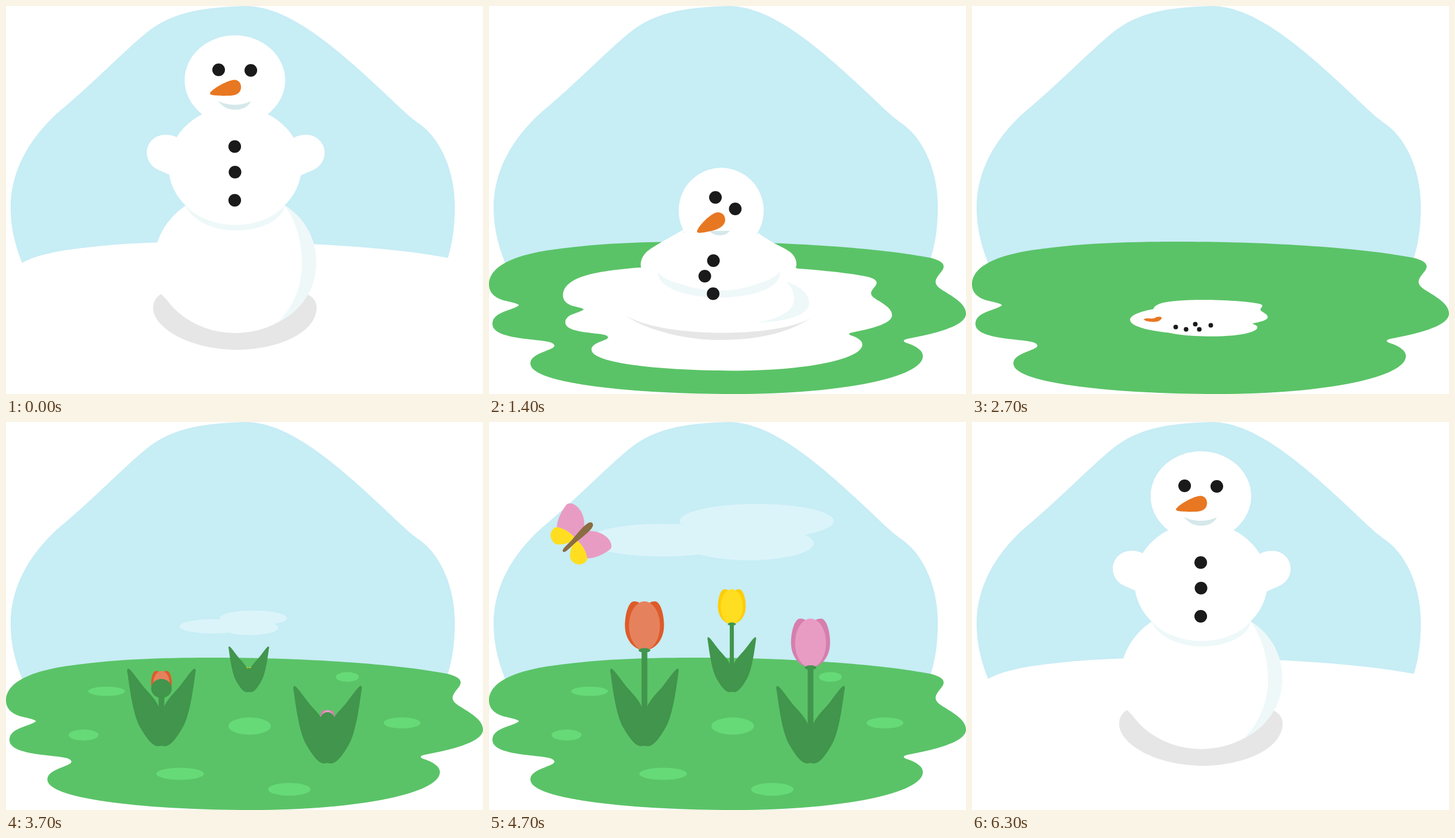
An HTML page with a canvas that plays this animation: 830 px wide and 675 px high, repeating every 6500 ms.

```html
<!DOCTYPE html>
<html lang="en">
<head>
<meta charset="utf-8">
<title>Snow melts into spring</title>
<style>
html, body { margin: 0; width: 100%; height: 100%; overflow: hidden; background: #fff; }
canvas { display: block; }
</style>
</head>
<body>
<canvas id="stage" width="830" height="675"></canvas>
<script>
const ctx = document.getElementById('stage').getContext('2d');
const LOOP = 6500, LAST_STEP = 46;
const WHITE = '#fff', GREEN = '#5ac367', LEAF = '#41954c', ICE = '#eef8f9', BLACK = '#1a1a1a';

const clamp = (v, lo = 0, hi = 1) => Math.min(hi, Math.max(lo, v));
const lerp = (a, b, p) => a + (b - a) * p;

// Blends the numbers of two equally built strings; keys are steps.
function tween(keys, s) {
  const steps = Object.keys(keys).map(Number);
  let i = 0;
  while (i < steps.length - 2 && s >= steps[i + 1]) i++;
  const [a, b] = [steps[i], steps[i + 1]];
  const p = clamp((s - a) / (b - a));
  const ends = keys[b].match(/-?[\d.]+/g);
  let n = 0;
  return keys[a].replace(/-?[\d.]+/g, v => lerp(+v, +ends[n++], p).toFixed(2));
}

function fill(path, color) {
  ctx.fillStyle = color;
  ctx.fill(new Path2D(path));
}

function ellipse(x, y, rx, ry, color) {
  ctx.fillStyle = color;
  ctx.beginPath();
  ctx.ellipse(x, y, Math.max(0, rx), Math.max(0, ry), 0, 0, 7);
  ctx.fill();
}

const oval = (keys, s, color) => ellipse(...tween(keys, s).split(' ').map(Number), color);

function place(x, y, scale, turn, draw) {
  ctx.save();
  ctx.translate(x, y);
  ctx.rotate(turn);
  ctx.scale(scale, scale);
  draw();
  ctx.restore();
}

function mirrored(draw) {
  draw();
  ctx.scale(-1, 1);
  draw();
  ctx.scale(-1, 1);
}

const SKY = 'M28,447 C15,414 8,384 8,350 C8,290 38,232 92,184 C150,136 200,83 245,46 C292,8 350,2 417,0 ' +
  'C498,0 588,84 690,181 C703,193 712,200 722,207 C758,234 781,290 781,348 C781,380 778,408 769,438 L400,500 Z';

const GROUND = 'M0,485 C0,452 45,433 110,424 C200,411 290,410 365,410 C520,410 680,421 768,438 ' +
  'C800,446 792,457 784,466 C775,477 775,483 783,490 C795,500 830,514 830,535 C830,558 770,571 728,579 ' +
  'C720,581 720,583 726,586 C745,592 755,600 755,609 C755,645 620,675 425,675 C260,675 72,658 72,622 ' +
  'C72,603 112,600 114,591 C112,583 95,583 72,580 C35,576 6,570 6,553 C6,532 40,530 52,521 ' +
  'C52,517 35,515 22,511 C8,506 0,497 0,485 Z';

const SNOW_SCALE = { 0: '1', 1: '1', 7: '0.695', 14: '0.4675', 20: '0.238', 24: '0' };

const SHADOW = {
  0: 'M270,501 C258,508 256,518 256,525 C256,560 320,598 402,598 C470,598 540.5,570 540.5,524 C540.5,514 534,506 525,502 C480,560 320,560 270,501',
  1: 'M260,504 C250,511 248.5,519 248.5,525 C248.5,562 315,596.5 400,596.5 C475,596.5 550.5,570 550.5,525 C550.5,516 546,509 538,505 C490,560 310,560 260,504',
  7: 'M228,531 C229,532 230,533 232,534 C260,558 330,581 402,581 C480,581 530,564 564,540 C566,539 567,538 568,537 C520,580 280,580 228,531'
};
const BASE = {
  0: '399 445 141 124', 1: '399 457 150 112.3', 7: '400 496 170 66',
  14: '395 535 135 50', 20: '383 546 108 24', 24: '410 545 0 0'
};
const BASE_SHADE = {
  0: 'M485,347 C520,368 540,405 540,446 C540,495 510,533 474,550 C500,523 515,487 515,450 C515,410 505,375 485,347',
  1: 'M497,371 C530,392 549,422 549,460 C549,505 515,538 474,554 C505,531 523,498 523,461 C523,425 512,395 497,371',
  7: 'M518,480 C540,486 557,501 557,516 C557,538 520,549 466,551 C500,545 531,532 531,510 C531,497 525,487 518,480'
};
const ARMS = [{
  0: 'M300,230 C292,225 284,224 277,224 C259,224 245,238 245,255 C245,268 253,280 265,285 L290,296 L320,270',
  1: 'M300,261 C290,258 284,256.5 276,256.5 C259,256.5 245.5,270 245.5,287 C245.5,303 257,315 270,318 L290,322 L320,290',
  7: 'M340,388 C320,400 285,418 274,428 C266,436 264,444 264,450 C264,457 268,462 278,466 L300,475 L330,440',
  14: 'M340,500 C320,505 305,510 295,515 C285,520 280,525 280,530 C280,535 285,540 290,545 L300,550 L330,530'
}, {
  0: 'M497,232 C505,226 513,224 523,224 C540,224 554.5,238 554.5,255 C554.5,270 545,281 533,286 L510,296 L480,270',
  1: 'M500,264 C510,261 516,260 524,260 C542,260 555,273 555,290 C555,306 543,319 529,320.5 L510,323 L480,290',
  7: 'M468,394 C488,411 510,418 524,428 C532,434 535,443 535,449 C535,456 530,462 520,466 L500,475 L470,440',
  14: 'M460,500 C480,505 495,510 505,515 C515,520 520,525 520,530 C520,535 515,540 510,545 L500,550 L470,530'
}];
const TORSO_SHADE = {
  0: 'M312,347 C355,392 445,392 485,347 C480,375 440,390.5 400,390.5 C355,390.5 322,370 312,347',
  1: 'M308,368 C355,410 445,410 491,368 C488,397 440,410 400,410 C355,410 325,397 308,368',
  7: 'M294,463 C320,500 480,500 506,462 C510,490 460,507 400,507 C340,507 294,490 294,463',
  14: 'M296,525 C310,570 490,570 500,525 C500,560 460,577 400,577 C340,577 298,560 296,525'
};
const TORSO = { 0: '398.5 278 116 103', 1: '399.5 304 115 97', 7: '400 440 108 55', 14: '398 530 110 40' };
const HEAD = { 0: '398.3 129 87.5 78', 1: '399.8 160 87.5 79', 7: '404 356 74 74.5', 14: '398 525 62 35' };
const MOUTH = {
  0: 'M369,165 C385,174 410,174 426,165.5 C422,176 410,180.5 398,180.5 C386,180.5 375,174 369,165',
  1: 'M370.5,196 C387,205 411,205 428,196 C423,207 411,211 400,211 C388,211 377,206 370.5,196',
  7: 'M383,391 C395,392 408,391 419,391 C415,397 408,399 401,399 C394,399 388,396 383,391',
  14: 'M385,545 C393,546 402,546 410,545 C406,548 402,549 398,549 C394,549 389,548 385,545'
};
const NOSE = {
  0: 'M355,152 C356,146 385,129 397,128.5 C405,128 409,135 409,141 C409,150 402,156 388,156 C375,156.5 353,156 355,152',
  1: 'M357,185 C358,178 385,161 397,160 C406,159 410,167 410,173 C410,182 402,187 388,188 C375,189 357,189 357,185',
  7: 'M362,392 C364,383 385,361 397,359 C406,358 411,365 411,372 C411,381 402,388 388,391 C375,394 361,397 362,392',
  14: 'M328,533 C332,524 352,518 366,516 C376,515 382,522 382,528 C382,536 372,541 360,543 C345,545 327,540 328,533',
  20: 'M299,545 C303,542 312,545 318,543 C322,540 328,540 330,542 C330,546 325,549 318,549.5 C310,550 300,548 299,545',
  23: 'M315,545 C315,545 315,545 315,545 C315,545 315,545 315,545 C315,545 315,545 315,545 C315,545 315,545 315,545'
};
// Two eyes, then three buttons.
const COALS = [
  { 0: '370 111 11 11', 1: '372 143 11 11', 7: '394 333 11 11', 14: '391 525 7.5 7.5', 20: '388.5 553.5 4 4', 23: '388 555 0 0' },
  { 0: '426 112 11 11', 1: '427.5 145 11 11', 7: '428.5 353 11 11', 14: '421 530 7.5 7.5', 20: '415.5 555.5 4 4', 23: '415 556 0 0' },
  { 0: '398 244.5 11 11', 1: '398 276.5 11 11', 7: '390.5 443 11 11', 14: '381 540 7.5 7.5', 20: '372.5 562.5 4 4', 23: '373 563 0 0' },
  { 0: '398.5 289 11 11', 1: '395.5 317.5 11 11', 7: '375.5 470 11 11', 14: '362 548 7.5 7.5', 20: '354.5 558.5 4 4', 23: '355 559 0 0' },
  { 0: '398 338 11 11', 1: '397 362.5 11 11', 7: '390 500.5 11 11', 14: '394 555 7.5 7.5', 20: '395.5 562.5 4 4', 23: '395 563 0 0' }
];

function snowman(s) {
  const fade = clamp((14 - s) / 7);
  const faded = (keys, color) => {
    ctx.globalAlpha = fade;
    fill(tween(keys, s), color);
    ctx.globalAlpha = 1;
  };
  faded(SHADOW, '#e6e6e6');
  oval(BASE, s, WHITE);
  if (s < 14) {
    faded(BASE_SHADE, ICE);
    ARMS.forEach(arm => fill(tween(arm, s), WHITE));
    faded(TORSO_SHADE, ICE);
    oval(TORSO, s, WHITE);
    oval(HEAD, s, WHITE);
    faded(MOUTH, '#d5e8ea');
  }
  fill(tween(NOSE, s), '#e87722');
  COALS.forEach(coal => oval(coal, s, BLACK));
}

const TUFTS = [
  [175, 468.5, 32, 8], [135, 544.5, 26, 9.5], [303, 612, 41.5, 10.5], [424, 529, 37, 15],
  [493, 639, 37, 11], [594, 443.5, 20, 8.5], [689, 523.5, 32, 9.5]
];

const LEAF_SHAPE = 'M-58,-135 C-60,-134 -60,-131 -59,-127 C-54,-90 -48,-50 -36,-31 C-25,-12 -15,0 -6,0 C-3,0 0,-1 0.4,-1 ' +
  'L0.4,-48 C-2,-78 -22,-91 -34,-107 C-44,-120 -54,-135 -58,-135 Z';
const PETAL = 'M-18,-85 C-28,-85 -34,-62 -34,-43 C-34,-18 -18,0 0,0 L0,-75 C-5,-80 -10,-85 -18,-85 Z';

const TULIPS = [
  { x: 422.5, y: 470, size: 0.71, leafy: 31, open: 36, dark: '#ffcd05', light: '#ffde22' },
  { x: 270.5, y: 564, size: 1, leafy: 29, open: 33.8, dark: '#de5b29', light: '#e5825d' },
  { x: 559.5, y: 594, size: 1, leafy: 30, open: 35, dark: '#d57fae', light: '#e89cc4' }
];

function tulip({ x, y, size, leafy, open, dark, light }, s) {
  place(x, y, size, 0, () => {
    const left = Math.max(0, open - s);
    const head = 1 - 0.124 * left, base = -167 + 21.3 * left;
    if (left < 6.3) {
      ctx.fillStyle = LEAF;
      ctx.fillRect(-5, base, 10, -40 - base);
      place(0, base, head, 0, () => {
        mirrored(() => fill(PETAL, dark));
        ellipse(0, -42.5, 27, 42.5, light);
        const ry = 42.5 * Math.min(1, 0.09 + 0.17 * left);
        ellipse(0, 4 - ry, 34 * Math.min(1, 0.3 + 0.184 * left), ry, LEAF);
      });
    }
    const grown = clamp((s - leafy + 6) / 6);
    if (grown > 0) place(0, 0, grown, 0, () => mirrored(() => fill(LEAF_SHAPE, LEAF)));
  });
}

function cloud(s) {
  if (s < 29) return;
  const p = Math.min(1, (s - 30) / 6);
  place(lerp(430.5, 466, p), lerp(341, 172.5, p), lerp(0.437, 1, p), 0, () => {
    ellipse(0, 0, 134, 30, '#dbf4fa');
    ellipse(-164, 33, 130, 28.5, '#dbf4fa');
    ellipse(-14, 38.5, 113, 29.5, '#dbf4fa');
  });
}

const UPPER_WING = 'M-3,-18 C-12,-32 -28,-38 -40,-37 C-50,-36 -56,-30 -54,-24 C-52,-10 -46,5 -38,13 C-28,6 -14,2 -3,4 Z';
const LOWER_WING = 'M-3,4 C-14,2 -30,6 -38,13 C-42,18 -40,25 -37,29 C-32,36 -20,38 -14,32 C-8,26 -4,18 -3,14 Z';
const BODY = 'M0,35 C-5,35 -3,22 -4,8 C-5,-6 -10,-36 0,-36 C10,-36 5,-6 4,8 C3,22 5,35 0,35 Z';

function butterfly(s) {
  if (s < 37) return;
  const wait = Math.max(0, 40 - s), p = clamp((s - 40) / 6);
  const x = 154 + 216 * p - 36 * wait + 6 * wait * wait;
  const y = 201 - 151.6 * p + 159.6 * p * p + 24 * wait;
  place(x, y, 1 - 0.25 * wait, 0.8 + 1.45 * p, () => {
    mirrored(() => {
      fill(LOWER_WING, '#ffde22');
      fill(UPPER_WING, '#e89cc4');
    });
    fill(BODY, '#8b6d43');
  });
}

function draw(s) {
  ctx.clearRect(0, 0, 830, 675);
  fill(SKY, '#c7edf5');
  cloud(s);
  fill(GROUND, s < 2 ? WHITE : GREEN);
  const tuft = clamp((s - 21) / 7);
  TUFTS.forEach(([x, y, rx, ry]) => ellipse(x, y, rx * tuft, ry * tuft, '#66da77'));
  if (s < 24) {
    place(415, 543, +tween(SNOW_SCALE, s), 0, () => {
      ctx.translate(-415, -542.5);
      fill(GROUND, WHITE);
    });
    snowman(s);
  }
  TULIPS.forEach(t => tulip(t, s));
  butterfly(s);
}

// The picture advances in steps of 100 ms between two rests.
function stepAt(t) {
  if (t < 800 || t >= 6300) return 0;
  return Math.min(LAST_STEP, Math.floor((t - 800) / 100) + 1);
}

const start = performance.now();
function tick() {
  draw(stepAt((performance.now() - start) % LOOP));
  requestAnimationFrame(tick);
}
tick();
</script>
</body>
</html>
```
